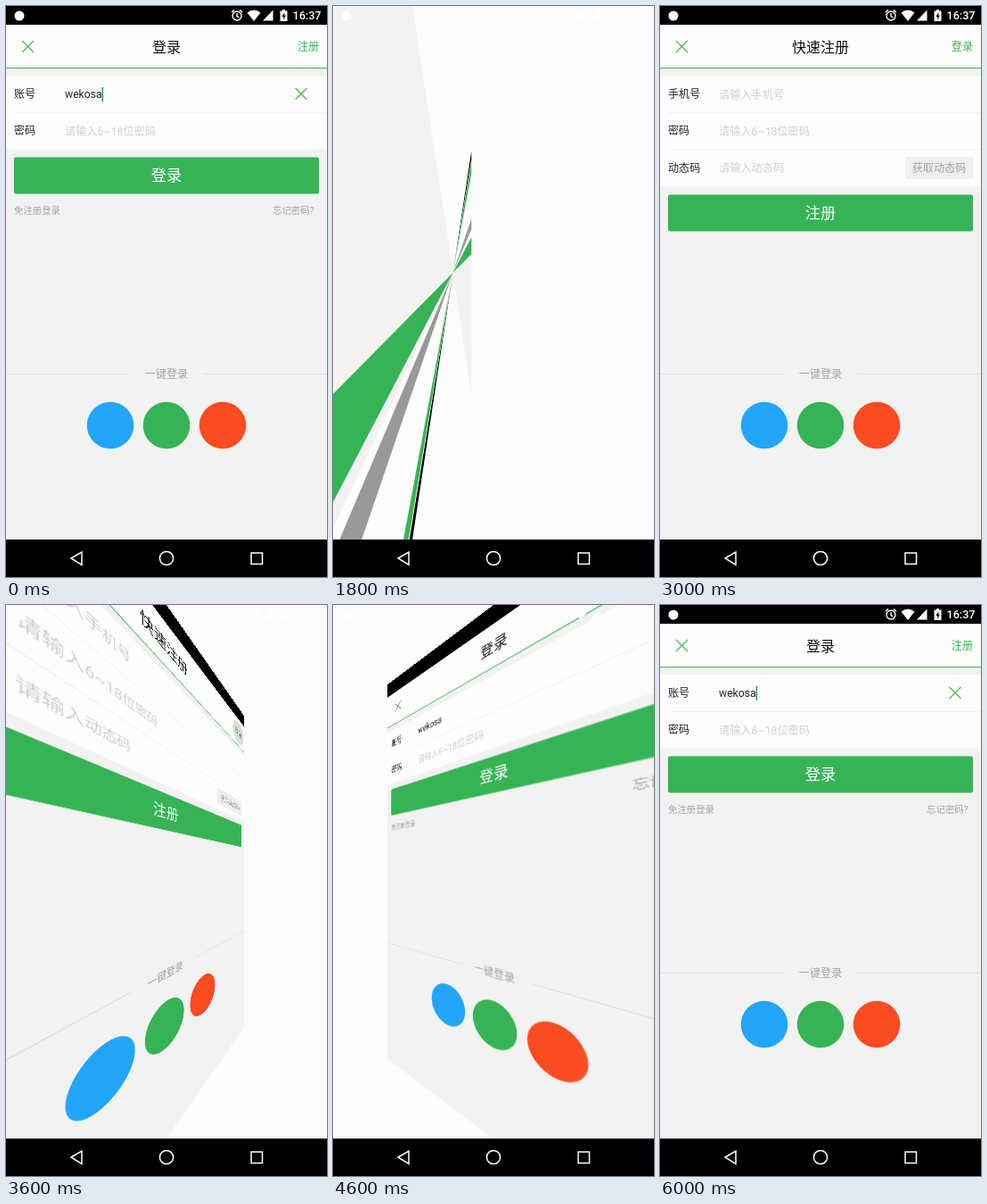
These frames come from a looping animation (360 px wide and 640 px high, 6200 ms). An HTML page:

```html
<!DOCTYPE html>
<html lang="zh-CN">
<head>
<meta charset="utf-8">
<style>
  html, body { margin: 0; width: 100%; height: 100%; overflow: hidden; }
  #stage { position: relative; width: 360px; height: 640px; overflow: hidden; background: #fcfcfc; }
  #scene { position: absolute; left: 0; top: 0; width: 360px; height: 598px;
           perspective: 144px; perspective-origin: 180px 299px; }
  .page { position: absolute; left: 0; top: 0; width: 360px; height: 598px; transform-origin: 180px 299px; }
  svg { display: block; position: absolute; left: 0; top: 0; }
  text { font-family: Roboto, "Noto Sans CJK SC", "Noto Sans CJK", sans-serif; }
</style>
</head>
<body>
<div id="stage">
  <div id="scene">
    <div class="page" id="login"></div>
    <div class="page" id="register"></div>
  </div>
  <svg id="stripes" width="360" height="598"></svg>
  <svg width="360" height="640">
    <g fill="#fff">
      <circle cx="15" cy="11" r="5.5"/>
      <path d="M270.5 7.5Q278 1.5 285.5 7.5L278 17ZM288 16.5L299.5 4.5V16.5Z"/>
      <path fill-rule="evenodd" d="M307.5 5.5H310V4H313V5.5H315.5V17H307.5ZM312.5 7L309.3 12H311.2V15.5L314 10.6H312.2Z"/>
      <text x="321.5" y="15" font-size="12.6" font-weight="500">16:37</text>
    </g>
    <g fill="none" stroke="#fff" stroke-width="1.4">
      <circle cx="259" cy="11" r="5"/>
      <path d="M259 8V11.4L261.4 13M253 7L256 4.4M265 7L262 4.4"/>
    </g>
    <rect y="598" width="360" height="42"/>
    <g fill="none" stroke="#fff" stroke-width="1.5">
      <path d="M73 619L85 612V626.5Z"/>
      <circle cx="180" cy="619" r="7.6"/>
      <rect x="275" y="613" width="12.5" height="12.5"/>
    </g>
  </svg>
</div>
<script>
const GREEN = '#36b455', LIME = '#52b84f', PAPER = '#f2f2f1', WHITE = '#fdfdfd',
      GREY = '#a2a2a2', HINT = '#d0d0d0', RULE = '#dededc', INK = '#222';
const CAMERA = 144, HALF = 180, MID = 299, LOOP = 6200, STEP = 200;
const $ = id => document.getElementById(id);

const rect = (x, y, w, h, fill, r = 0) =>
  `<rect x="${x}" y="${y}" width="${w}" height="${h}" rx="${r}" fill="${fill}"/>`;
const label = (s, x, mid, size, fill, anchor = 'start') =>
  `<text x="${x}" y="${mid + size * 0.37}" font-size="${size}" fill="${fill}" text-anchor="${anchor}">${s}</text>`;
const cross = (x, y) =>
  `<path d="M${x - 6.5} ${y - 6.5}l13 13m0-13l-13 13" stroke="${LIME}" stroke-width="1.3"/>`;
const field = (name, value, mid, fill = HINT) =>
  label(name, 9, mid, 12.1, INK) + label(value, 66, mid, 12.2, fill);

// Parts shared by both screens
function screen({ title, link, action, rows, body }) {
  const bottom = 76 + rows * 42.2;
  let s = rect(0, 0, 360, 598, PAPER) + rect(0, 0, 360, 21, '#000') +
    rect(0, 21, 360, 48, WHITE) + rect(0, 69, 360, 1.2, '#4fbb66') +
    rect(0, 78, 360, bottom - 78, WHITE);
  for (let i = 1; i < rows; i++) s += rect(9, 78 + i * 41.3, 351, 0.8, '#f0f0ef');
  s += `<circle class="ripple" cx="339" cy="46" r="19" fill="#dcdcda"/>`;
  s += cross(24.5, 45.5) + label(title, 180, 46, 16, '#111', 'middle') + label(link, 351, 46, 12.1, GREEN, 'end');
  s += rect(9, bottom + 9, 342, 41, GREEN, 2) + label(action, 180, bottom + 29.5, 17.2, '#fff', 'middle');
  s += rect(0, 412, 139, 0.9, RULE) + rect(222, 412, 138, 0.9, RULE) +
    label('一键登录', 180, 413, 12.1, GREY, 'middle');
  [[117, '#22a6fa'], [180, GREEN], [243, '#fd4b22']].forEach(([x, c]) =>
    s += `<circle cx="${x}" cy="470" r="26.3" fill="${c}"/>`);
  return `<svg width="360" height="598">${s}${body}</svg>`;
}

$('login').innerHTML = screen({
  title: '登录', link: '注册', action: '登录', rows: 2,
  body: field('账号', '', 99) + label('wekosa', 66, 98.5, 12.2, INK) + cross(331, 98.5) +
    field('密码', '请输入6~18位密码', 140) +
    `<rect id="caret" x="107.5" y="91" width="1.6" height="16" fill="#2f9c72"/>` +
    label('免注册登录', 9, 229.5, 10.4, GREY) + label('忘记密码?', 299, 229.5, 10.4, GREY)
});
$('register').innerHTML = screen({
  title: '快速注册', link: '登录', action: '注册', rows: 3,
  body: field('手机号', '请输入手机号', 99) + field('密码', '请输入6~18位密码', 140) +
    field('动态码', '请输入动态码', 181.5) + rect(275, 169, 76, 25, '#efefee', 1) +
    label('获取动态码', 313, 181.5, 12.1, GREY, 'middle')
});

// Horizontal bands [top, bottom, colour] smeared when an edge passes the camera
const HEAD = [[0, 598, PAPER], [0, 21, '#000'], [21, 69, WHITE], [26, 54, GREEN]];
const BANDS = {
  login: [...HEAD, [70, 160, WHITE], [167, 210, GREEN], [210, 249, '#999']],
  register: [...HEAD, [70, 202, WHITE], [166, 192, '#999'], [212, 253, GREEN]]
};

function smear(name, deg) {
  const a = deg * Math.PI / 180, side = Math.sign(deg);
  const far = side * HALF * Math.cos(a) * CAMERA / (CAMERA + HALF * Math.abs(Math.sin(a)));
  const near = side * HALF;
  const at = (x, y) => `${HALF + x},${MID + (y - MID) * (1 - x * Math.tan(a) / CAMERA)}`;
  return BANDS[name].map(([t, b, c]) =>
    `<polygon points="${at(far, t)} ${at(near, t)} ${at(near, b)} ${at(far, b)}" fill="${c}"/>`).join('');
}

// Each turn speeds up to edge-on, then slows down with the other screen
const TURN = 2400, OUT = 621, IN = 1704, SPAN = 935;
const clamp = p => Math.max(0, Math.min(1, p));
function pose(t) {
  const local = t < 3000 ? t : t - TURN;
  const turned = local > 1640;
  const name = (t < 3000) === turned ? 'register' : 'login';
  const deg = turned ? -90 * (1 - clamp((local - IN) / SPAN)) ** 2
                     : 90 * clamp((local - OUT) / SPAN) ** 2;
  return { name, deg };
}

let last = -1;
function draw() {
  const t = Math.floor(performance.now() % LOOP / STEP) * STEP;
  if (t !== last) {
    last = t;
    const { name, deg } = pose(t);
    const edgeOn = Math.abs(deg) > 89.9;
    const past = HALF * Math.sin(Math.abs(deg) * Math.PI / 180) >= CAMERA;
    for (const id of ['login', 'register']) {
      $(id).style.display = id === name && !past ? 'block' : 'none';
      $(id).style.transform = deg ? `rotateY(${deg}deg)` : 'none';
    }
    $('stripes').innerHTML = past && !edgeOn ? smear(name, deg) : '';
    document.querySelectorAll('.ripple').forEach(r => r.style.display = deg > 0 ? '' : 'none');
    $('caret').style.display = !deg && t % 1000 < 500 ? '' : 'none';
  }
  requestAnimationFrame(draw);
}
draw();
</script>
</body>
</html>
```
